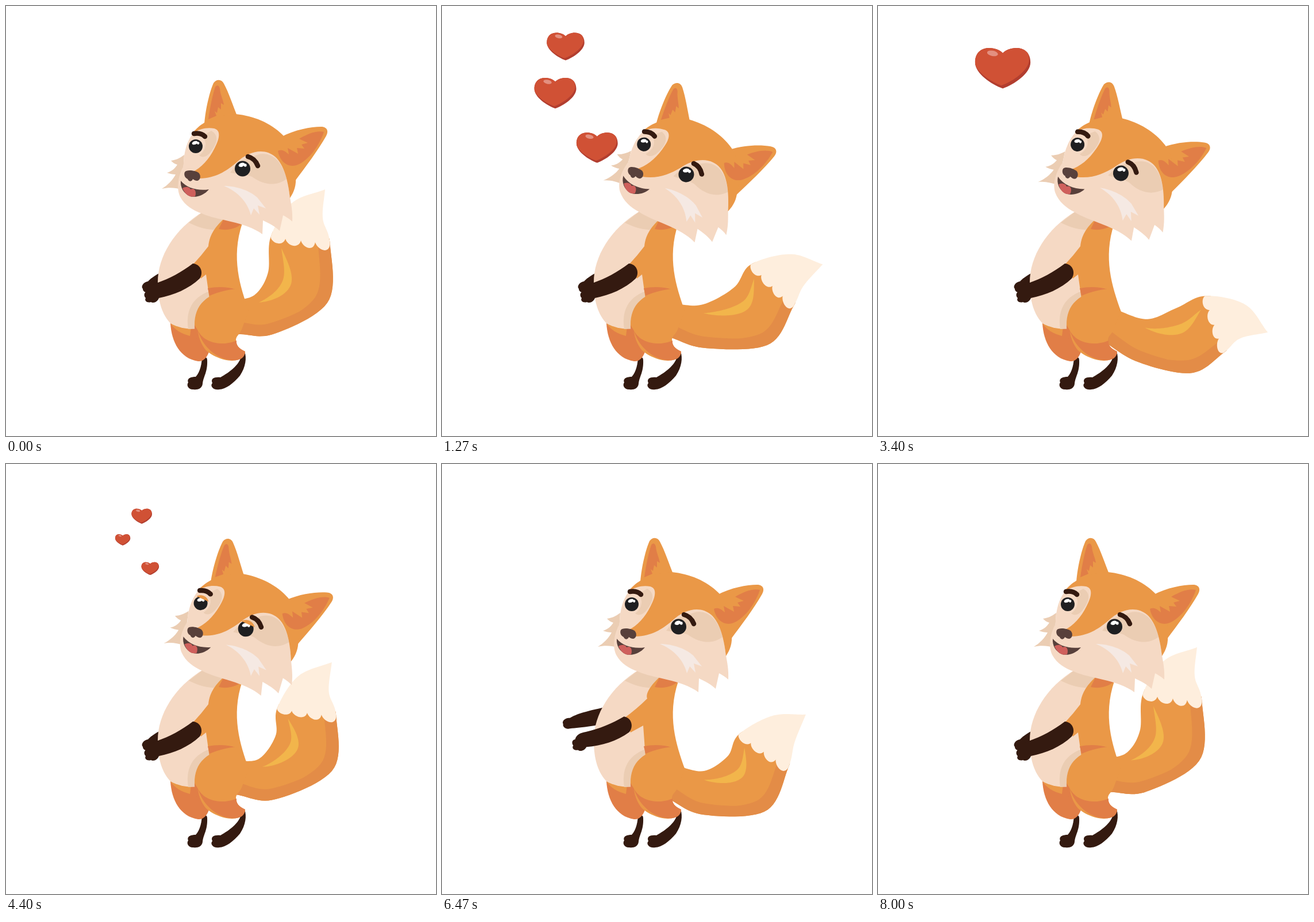
An HTML page with a canvas that plays this animation: 748x748 px, repeating every 8.07 s.

```html
<!DOCTYPE html>
<html lang="en">
<head>
<meta charset="utf-8">
<title>Fox in love</title>
<style>
html, body { margin: 0; width: 100%; height: 100%; overflow: hidden; background: #fff; }
canvas { display: block; width: 100vmin; height: 100vmin; }
</style>
</head>
<body>
<canvas id="stage" width="748" height="748"></canvas>
<script>
const ctx = document.getElementById('stage').getContext('2d');
const LOOP = 8070, STEP = LOOP / 121, SWAY = LOOP / 4, BEAT = 4000 / 3;

const C = {
  fur: '#ea9847', deep: '#e17e47', shade: '#e38c47', gold: '#f2b54b',
  cream: '#f5d9c4', beige: '#ebcdb3', tip: '#feeedd', dark: '#341a10',
  eye: '#1f1f21', nose: '#58403b', tongue: '#cf605c', streak: '#f5e9e3',
  heart: '#d05135', heartDark: '#b23e2f', gloss: '#e39080'
};

const lerp = (a, b, k) => a + (b - a) * k;
const clamp = (v) => Math.max(0, Math.min(1, v));
const ease = (v) => (1 - Math.cos(Math.PI * clamp(v))) / 2;

// Smooth curve through rows of [time, value, value, ...]
function track(keys, t) {
  const last = keys.length - 1;
  let i = 0;
  while (i < last - 1 && t >= keys[i + 1][0]) i++;
  const a = keys[i], b = keys[i + 1], span = b[0] - a[0];
  const k = clamp((t - a[0]) / span);
  const slope = (n, j) => {
    const p = keys[Math.max(0, n - 1)], q = keys[Math.min(last, n + 1)];
    return (q[j] - p[j]) / (q[0] - p[0]);
  };
  const k2 = k * k, k3 = k2 * k;
  return a.slice(1).map((v, n) => {
    const j = n + 1;
    return v * (2 * k3 - 3 * k2 + 1) + b[j] * (3 * k2 - 2 * k3)
      + span * (slope(i, j) * (k3 - 2 * k2 + k) + slope(i + 1, j) * (k3 - k2));
  });
}

function fill(d, color) {
  ctx.fillStyle = color;
  ctx.fill(new Path2D(d));
}

function dot(x, y, rx, ry, color, turn = 0) {
  ctx.fillStyle = color;
  ctx.beginPath();
  ctx.ellipse(x, y, rx, ry, turn, 0, Math.PI * 2);
  ctx.fill();
}

function polygon(points, color) {
  ctx.fillStyle = color;
  ctx.beginPath();
  points.forEach(([x, y]) => ctx.lineTo(x, y));
  ctx.fill();
}

// Tail: spine points from root to tip for each pose
const POSES = {
  up:    [400, 542, 450, 536, 508, 489, 512, 408, 524, 356, 555, 319],
  drop:  [400, 546, 452, 548, 510, 500, 505, 423, 513, 365, 525, 326],
  fall:  [400, 553, 455, 572, 530, 556, 559, 500, 594, 461, 633, 436],
  low:   [400, 556, 455, 592, 520, 607, 578, 590, 618, 573, 656, 563],
  out:   [400, 554, 460, 582, 532, 582, 585, 554, 634, 549, 678, 568],
  rise:  [400, 547, 456, 557, 538, 539, 574, 486, 617, 459, 662, 449],
  lift:  [400, 546, 454, 548, 519, 502, 523, 433, 535, 383, 567, 345]
};
const HALF = [29, 38, 58, 52, 30, 0];
const TAIL = [
  [0, 'up'], [380, 'drop'], [870, 'fall'], [1270, 'rise'], [1600, 'lift'],
  [2000, 'up'], [2400, 'drop'], [2600, 'fall'], [2950, 'low'], [3400, 'out'],
  [3850, 'rise'], [4400, 'lift'], [4620, 'up'], [4800, 'drop'], [5000, 'fall'],
  [5220, 'low'], [5500, 'out'], [5720, 'rise'], [5900, 'lift'], [6050, 'up'],
  [6230, 'drop'], [6470, 'fall'], [6960, 'low'], [7250, 'out'], [7500, 'rise'],
  [7760, 'lift'], [8000, 'up'], [8070, 'up']
].map(([t, name]) => [t, ...POSES[name]]);

function drawTail(t) {
  const p = track(TAIL, t), tipEnd = HALF.length - 1;
  // Both edges are smooth curves through the nodes, offset by the half width
  const edgeKeys = (side) => HALF.map((h, i) => {
    const a = 2 * Math.max(0, i - 1), b = 2 * Math.min(tipEnd, i + 1);
    const dx = p[b] - p[a], dy = p[b + 1] - p[a + 1], k = h * side / Math.hypot(dx, dy);
    return [i, p[2 * i] - dy * k, p[2 * i + 1] + dx * k];
  });
  const innerKeys = edgeKeys(-1), outerKeys = edgeKeys(1);
  // u runs along the tail, side from -1 (inner) to 1 (outer)
  const at = (u, side) => {
    const a = track(innerKeys, u), b = track(outerKeys, u), k = (side + 1) / 2;
    return [lerp(a[0], b[0], k), lerp(a[1], b[1], k)];
  };
  const band = (from, to, inner, outer) => {
    const left = [], right = [];
    for (let i = 0; i <= 40; i++) {
      const s = i / 40, u = lerp(from, to, s);
      left.push(at(u, inner(s)));
      right.unshift(at(u, outer(s)));
    }
    return left.concat(right);
  };
  const edge = (v) => () => v;
  polygon(band(0, 3.15, edge(-1), edge(1)), C.fur);
  polygon(band(0, 3.15, (s) => lerp(0.25, 0.6, Math.min(1, s * 2)), edge(1)), C.shade);
  polygon(band(1, 2.75,
    (s) => -0.6 + 0.1 * Math.sin(Math.PI * s),
    (s) => -0.6 + 0.38 * Math.sin(Math.PI * s)), C.gold);

  ctx.fillStyle = C.tip;
  ctx.beginPath();
  band(3, tipEnd, edge(-1), edge(1)).forEach(([x, y]) => ctx.lineTo(x, y));
  const cuts = [1, 0.5, 0.02, -0.5, -1];
  for (let i = 1; i < cuts.length; i++) {
    const a = at(2.78, lerp(cuts[i - 1], cuts[i], 0.15));
    const b = at(2.84, lerp(cuts[i - 1], cuts[i], 0.85));
    const end = at(3, cuts[i]);
    ctx.bezierCurveTo(a[0], a[1], b[0], b[1], end[0], end[1]);
  }
  ctx.fill();
}

function drawArm(d, px, py, turn, dx, dy) {
  ctx.save();
  ctx.translate(px + dx, py + dy);
  ctx.rotate(turn * Math.PI / 180);
  ctx.translate(-px, -py);
  fill(d, C.dark);
  ctx.restore();
}

function drawBody(reach) {
  drawArm('M320 438C290 452 258 467 247 479C239 480 234 488 238 492C238 498 246 500 251 497C270 490 300 482 325 462Z',
    245, 490, 13.5 * reach, -27 * reach, -38 * reach);

  // Far leg
  fill('M341 607C346 612 350 610 350 616C351 637 343 645 342 657C341 666 333 668 326 667C318 668 313 660 317 655C314 647 323 645 330 645C338 636 341 622 341 607Z', C.dark);
  fill('M286 552C288 585 303 613 334 618C344 619 350 610 353 602L345 555Z', C.deep);
  fill('M286 552C298 556 314 560 322 558L320 574C305 570 293 563 286 552Z', C.fur);

  // Belly
  fill('M344 357C292 388 264 437 264 480C264 515 272 537 286 552C300 560 318 563 332 561L390 500L390 365Z', C.cream);
  fill('M317 562C312 530 324 507 354 496L360 540L330 561Z', C.beige);
  fill('M318 377C340 388 360 391 376 389L390 360L344 357Z', C.beige);

  const x = (a, b) => lerp(a, b, reach);
  fill(`M379 370C361 387 354 400 ${x(352, 357)} ${x(418, 408)}Q${x(340, 340)} ${x(434, 425)} ${x(325, 317)} ${x(450, 442)}`
    + `L${x(339, 328)} ${x(474, 467)}L${x(348, 350)} ${x(467, 455)}L354 510L410 560L423 532C407 488 391 438 411 378Z`, C.fur);
  fill('M379 370L411 376L409 380C398 388 384 391 370 388Z', C.deep);
  fill('M351 491C366 488 385 488 400 493C380 495 365 499 354 504Z', C.deep);

  // Near leg
  fill('M415 601C419 612 417 628 407 643C396 656 382 667 371 667C361 669 354 661 359 656C355 647 364 645 373 646C389 637 405 625 409 610Z', C.dark);
  fill('M400 492C348 498 328 520 328 555C329 583 343 599 365 610C384 619 404 619 411 611C415 607 416 604 416 601C405 596 400 590 400 580C401 573 408 570 411 560L422 530Z', C.fur);
  fill('M334 565C343 582 362 588 381 587C390 586 396 584 401 582C400 590 405 596 416 601C416 606 413 611 410 613C390 624 347 608 334 565Z', C.deep);
  fill('M328 555C328 580 339 597 352 604C341 592 335 579 334 565Z', C.deep);

  drawArm('M325 448C339 449 344 464 337 474C318 492 292 503 266 508C264 514 257 518 252 515C246 517 240 513 243 508C239 504 240 498 245 497C246 489 252 485 262 482C285 474 305 463 325 448Z',
    332, 462, 6.5 * reach, -10 * reach, -8 * reach);
}

function drawEye(x, y, r, lid) {
  dot(x, y, r, r, C.eye);
  dot(x - 1.5, y - r * 0.5, r * 0.42, r * 0.25, '#fff', -0.35);
  dot(x + r * 0.35, y - r * 0.45, r * 0.18, r * 0.2, '#fff');
  if (lid <= 0) return;
  const R = r + 2;
  ctx.save();
  ctx.beginPath();
  ctx.arc(x, y, R, 0, Math.PI * 2);
  ctx.clip();
  ctx.translate(x, y);
  ctx.rotate(0.35);
  ctx.fillStyle = C.fur;
  ctx.fillRect(-R, -R, 2 * R, 2 * R * lid);
  ctx.restore();
}

function brow(d) {
  ctx.strokeStyle = C.dark;
  ctx.lineWidth = 8.5;
  ctx.lineCap = 'round';
  ctx.stroke(new Path2D(d));
}

function drawHead(angle, lid) {
  ctx.save();
  ctx.translate(360, 366);
  ctx.rotate(angle * Math.PI / 180);
  ctx.translate(-360, -366);

  // Far cheek fur
  fill('M310 259C302 265 295 268 287 269C291 273 294 275 298 276C293 284 287 288 280 290C285 292 290 293 295 293C290 303 281 312 271 318C283 315 294 316 306 319Z', C.beige);

  // Ears
  fill('M345 206C347 178 355 147 361 134C366 127 375 127 379 135C388 152 394 171 402 191Z', C.fur);
  fill('M352 197C355 175 360 152 364 141C367 136 371 138 372 144C373 155 378 164 379 172L374 169L374 180L369 176L367 186L363 183L366 191Z', C.deep);
  fill('M478 228C503 215 530 210 548 210C558 210 562 217 557 226C543 251 521 280 503 304Z', C.fur);

  // Face
  fill('M340 206C322 220 309 243 309 278C299 296 296 317 303 332C311 347 326 356 341 361C366 373 417 375 446 397L447 373C458 378 469 384 476 391L482 364C488 367 494 371 498 375C499 358 496 345 494 333L480 240Z', C.cream);
  fill('M357 217C368 223 371 235 356 254C350 262 342 265 336 260C348 251 351 237 341 226Z', C.beige);
  fill('M428 263C450 250 477 258 488 301C470 314 449 312 428 297C420 293 405 293 390 290L405 270Z', C.beige);
  fill('M345 203C337 208 329 215 324 222C337 213 350 211 362 213C374 216 372 230 363 247C353 267 340 281 324 289L337 300C365 299 382 288 400 273C425 249 452 248 468 262C484 276 491 306 494 334C502 322 505 311 504 297C506 267 497 241 481 224C460 203 430 191 400 188C379 188 360 195 345 203Z', C.fur);
  fill('M553 219C545 243 528 266 510 275C494 283 477 274 473 252C479 249 484 251 492 258L490 247L508 257L506 247L519 248L514 241L525 238L510 231C525 222 541 216 553 219Z', C.deep);

  // Features
  drawEye(330, 244, 12, lid);
  drawEye(411.5, 283, 13.5, lid);
  brow('M327 222Q339 220 346 227');
  brow('M421 262Q433 265 438 278');
  fill('M311 289C314 284 329 286 335 290C340 295 338 303 333 304C329 304 327 302 325 301C323 306 318 306 316 301C311 299 309 293 311 289Z', C.nose);
  fill('M304 304C315 317 334 322 353 319C345 329 331 334 320 331C309 326 303 316 304 304Z', C.nose);
  fill('M307 317C313 313 320 315 321 319C328 315 332 323 329 331C319 334 311 327 307 317Z', C.tongue);
  fill('M379 313C402 313 425 322 437 333L452 352L438 347L441 363L431 352L426 364C420 340 402 322 379 313Z', C.streak);
  ctx.restore();
}

// Hearts: time in the beat, centre and width
const HEARTS = [
  [[330, 200, 140, 0], [400, 203, 132, 26], [733, 217, 108, 96], [870, 220, 104, 98], [1067, 219, 87, 92], [1270, 215, 70, 65], [1360, 214, 60, 48], [1520, 214, 50, 0]],
  [[890, 222, 186, 0], [1067, 210, 169, 62], [1270, 197, 151, 73], [1400, 198, 136, 74], [1733, 236, 91, 36], [1880, 246, 74, 0]],
  [[930, 236, 272, 0], [1067, 249, 262, 45], [1270, 270, 246, 72], [1420, 272, 226, 70], [1733, 251, 182, 31], [1860, 242, 168, 0]]
];
const HEART = new Path2D('M0 -.27C.12 -.4 .5 -.43 .5 -.1C.5 .1 .2 .3 0 .37C-.2 .3 -.5 .1 -.5 -.1C-.5 -.43 -.12 -.4 0 -.27Z');

function drawHeart(x, y, w) {
  ctx.save();
  ctx.translate(x, y);
  ctx.scale(w, w);
  ctx.fillStyle = C.heartDark;
  ctx.fill(HEART);
  ctx.clip(HEART);
  ctx.translate(-0.025, -0.055);
  ctx.fillStyle = C.heart;
  ctx.fill(HEART);
  dot(-0.16, -0.21, 0.1, 0.048, C.gloss, 0.2);
  ctx.restore();
}

function drawHearts(t) {
  for (let n = 0; n < 4; n++) {
    const local = t - n * BEAT;
    for (const keys of HEARTS) {
      if (local <= keys[0][0] || local >= keys[keys.length - 1][0]) continue;
      const [x, y, w] = track(keys, local);
      if (w > 1) drawHeart(x, y, w);
    }
  }
}

function tilt(t) {
  if (t >= 3 * SWAY) return 0;
  const p = t % SWAY, top = 950;
  return 12.3 * (p < top ? ease(p / top) : ease((SWAY - p) / (SWAY - top)));
}

function blink(t) {
  if (t >= 3 * SWAY) return 0;
  return clamp(1 - Math.abs(t % SWAY - 470) / 130);
}

function draw(t) {
  ctx.fillStyle = '#fff';
  ctx.fillRect(0, 0, 748, 748);
  drawTail(t);
  drawBody(ease((t - 6110) / 320) * ease((7800 - t) / 320));
  drawHead(tilt(t), blink(t));
  drawHearts(t);
}

function frame(now) {
  const t = now % LOOP;
  draw(Math.floor(t / STEP + 0.05) * STEP);
  requestAnimationFrame(frame);
}
requestAnimationFrame(frame);
</script>
</body>
</html>
```
